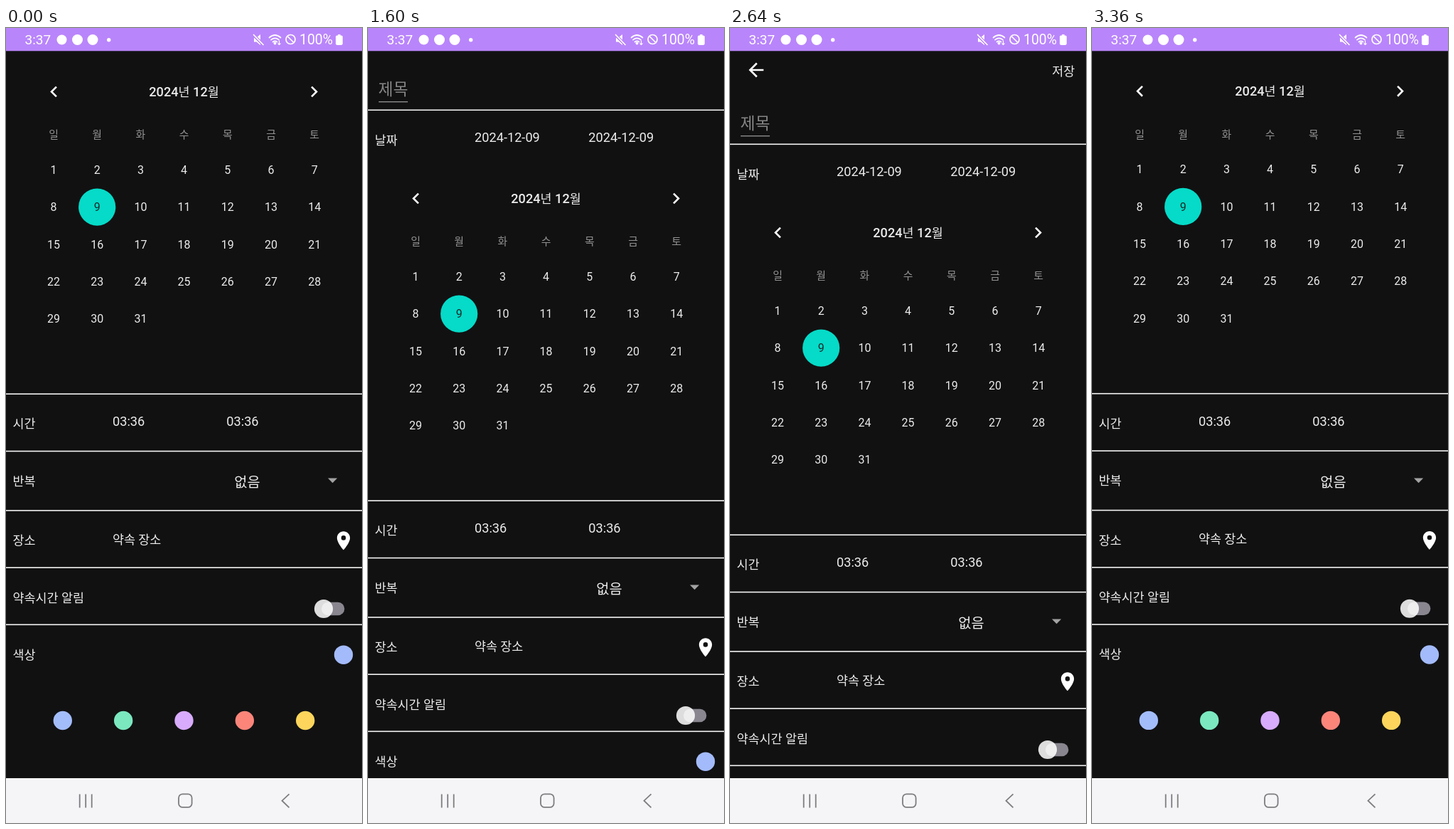
Recreate the animation shown at these times as an HTML page. Size 501 by 1117 pixels, loop 3440 ms.

```html
<!DOCTYPE html>
<html lang="ko">
<head>
<meta charset="utf-8">
<title>일정 추가</title>
<style>
  html, body { margin: 0; width: 100%; height: 100%; overflow: hidden; background: #111; }
  svg { display: block; width: 100%; height: 100%; }
  text { font-family: Roboto, 'Noto Sans CJK KR', 'Noto Sans CJK', sans-serif; fill: #ececec; }
  .mid { text-anchor: middle; }
  .bar text { fill: #fff; }
</style>
</head>
<body>
<svg viewBox="0 0 501 1117">
  <rect width="501" height="1117" fill="#111112"/>
  <g id="page"></g>
  <g class="bar">
    <rect width="501" height="32.3" fill="#b985fb"/>
    <text x="26.5" y="23" font-size="19">3:37</text>
    <g fill="#fff">
      <circle cx="78.5" cy="16.5" r="7"/>
      <circle cx="100.5" cy="16.5" r="7.5"/>
      <circle cx="122" cy="16.5" r="7.5"/>
      <circle cx="144.7" cy="16.7" r="2.7"/>
      <path d="M349 13.5h3.5l5.5-4.5v15l-5.5-4.5h-3.5z"/>
      <path d="M465.8 10.5h1.4v-1.5h3.4v1.5h1.4q1.8 0 1.8 1.8v9.8q0 1.8-1.8 1.8h-6.2q-1.8 0-1.8-1.8v-9.8q0-1.8 1.8-1.8z"/>
      <circle cx="378.5" cy="21.5" r="1.9"/>
    </g>
    <path d="M348 9.5L362 23.5" stroke="#b985fb" stroke-width="4"/>
    <g fill="none" stroke="#fff" stroke-width="1.7" stroke-linecap="round">
      <path d="M348.5 9.5L362 23.5"/>
      <path d="M370.5 13.5q8-7 16 0M373 16.7q5.500-4.500 11 0M375.500 19.500q3-2.300 6 0"/>
      <path d="M384.500 18v5.500m-1.700-1.700l1.700 1.700 1.700-1.700" stroke-width="1.200"/>
      <circle cx="400.5" cy="16" r="6.5"/>
      <path d="M396 11.500l9 9"/>
    </g>
    <text x="413" y="23" font-size="19.4">100%</text>
  </g>
  <rect y="1054" width="501" height="63" fill="#f5f5f7"/>
  <g fill="none" stroke="#7d7d81" stroke-width="1.8">
    <path d="M103.700 1076.500v19M112.200 1076.500v19M120.700 1076.500v19"/>
    <rect x="243" y="1076.300" width="18.600" height="18.600" rx="5.500"/>
    <path d="M398.500 1076.300L388.500 1085.700L398.500 1095.300"/>
  </g>
</svg>
<script>
const LOOP = 3440, STEP = 80, TOP = 32, BOTTOM = 1054, DP = 1.305;
const page = document.getElementById('page');
const items = [];

// Adds markup drawn around a local y of 0; y is its place with the page scrolled to the end.
function add(y, markup, rigid = false) {
  const el = document.createElementNS('http://www.w3.org/2000/svg', 'g');
  el.innerHTML = markup;
  page.append(el);
  items.push({ el, y, rigid });
  return el;
}
const text = (y, x, size, str, attrs = '', lift = 0.38) =>
  add(y, `<text x="${x}" y="${size * lift}" font-size="${size}" ${attrs}>${str}</text>`);
const digits = (y, x, size, str, attrs) => text(y, x, size, str, attrs, 0.356);
const disc = (y, x, r, fill) => add(y, `<circle cx="${x}" r="${r}" fill="${fill}"/>`);
const icon = (y, x, d) =>
  add(y, `<path transform="translate(${x}) scale(${DP}) translate(-12 -12)" fill="#fff" fill-rule="evenodd" d="${d}"/>`);

// Header and title field
icon(-139, 36.8, 'M20 11H7.83l5.59-5.59L12 4l-8 8 8 8 1.41-1.41L7.83 13H20z');
text(-138, 453.3, 17.4, '저장', 'font-weight="500"');
text(-64.5, 14.5, 22.8, '제목', 'style="fill:#858585"');
add(-46.3, '<rect x="15" y="-.7" width="41" height="1.4" fill="#8b8b8b"/>');

// Dividers and row labels
for (const y of [-34.7, 514.2, 594.6, 678, 758.2, 838.3])
  add(y, '<rect y="-.8" width="501" height="1.6" fill="#f4f4f4"/>');
Object.entries({ 날짜: 7, 시간: 555.5, 반복: 636, 장소: 719.5, '약속시간 알림': 800, 색상: 880 })
  .forEach(([label, y]) => text(y, 9.6, 17.4, label));
for (const x of [150, 310.3]) {
  digits(4, x, 18.2, '2024-12-09');
  digits(553, x, 18.2, '03:36');
}

// Calendar
icon(89.5, 67.4, 'M15.41 7.41L14 6l-6 6 6 6 1.41-1.41L10.83 12z');
icon(89.5, 433.6, 'M8.59 16.59L13.17 12 8.59 7.41 10 6l6 6-6 6z');
const hangul = s => `<tspan font-size="17.4">${s}</tspan>`;
digits(89.5, 250.5, 18.2, `2024${hangul('년')} 12${hangul('월')}`, 'class="mid" font-weight="500"');
const column = i => 67 + 61.2 * i;
const week = j => 199.2 + 52.35 * j;
[...'일월화수목금토'].forEach((day, i) =>
  text(149.5, column(i), 14.9, day, 'class="mid" style="fill:#929292"'));
disc(week(1), column(1), 26.1, '#05dbc8');
const ripple = disc(week(4), column(0), 26.1, '#404141');
for (let day = 1; day <= 31; day++) {
  const i = day - 1;
  digits(week(Math.floor(i / 7)), column(i % 7), 16, day,
    'class="mid"' + (day === 9 ? ' style="fill:#1c2a2a"' : ''));
}

// Repeat, place, alarm and colour controls
text(637.5, 321.2, 19.8, '없음');
add(636, '<path d="M453-3.400h13.200l-6.600 6.600z" fill="#a3a3a3"/>', true);
text(718, 150, 17.4, '약속 장소');
icon(720.3, 475, 'M12 2C8.13 2 5 5.13 5 9c0 5.25 7 13 7 13s7-7.75 7-13c0-3.87-3.130-7-7-7zm0 9.500a2.500 2.500 0 0 1 0-5 2.500 2.500 0 0 1 0 5z');
add(816, '<rect x="444" y="-9.200" width="32.400" height="18.400" rx="9.200" fill="#89868f"/>' +
  '<circle cx="447" r="13.100" fill="#fff" opacity=".86"/>');
disc(880.7, 475, 13.2, '#a3bbfb');
['#a3bdfb', '#7be8bf', '#d8abfc', '#fc857a', '#fdd55c']
  .forEach((fill, i) => disc(973, 79.8 + 85.35 * i, 13.2, fill));

// Scroll distance from the end of the page, and overscroll (+ top edge, - bottom edge).
const scrollKeys = [[1280, 0], [1360, 10], [1440, 45], [1520, 97], [1600, 150], [1680, 192], [1760, 213],
  [2560, 213], [2640, 198], [2720, 156], [2800, 108.3], [2880, 66], [2960, 32], [3040, 10], [3120, 0]];
const stretchKeys = [[1760, 0.2], [1840, 0.8], [1920, 1], [2000, 0.55], [2080, 0.22], [2160, 0.07], [2240, 0],
  [3040, 0], [3120, -0.5], [3200, -0.35], [3280, -0.15], [3360, -0.05]];

function sample(keys, t) {
  const n = keys.findIndex(([time]) => time > t);
  if (n === 0) return 0;
  if (n < 0) return keys[keys.length - 1][1];
  const [t0, a] = keys[n - 1], [t1, b] = keys[n];
  return a + (b - a) * (t - t0) / (t1 - t0);
}

const bulge = d => 0.0251 * d - 1.2e-5 * d * d;

function draw(now) {
  const t = Math.floor(now % LOOP / STEP) * STEP;
  const scroll = sample(scrollKeys, t), stretch = sample(stretchKeys, t);
  for (const { el, y, rigid } of items) {
    let pos = y + scroll;
    if (!rigid) pos += stretch * bulge(stretch > 0 ? pos - TOP : BOTTOM - pos);
    el.setAttribute('transform', `translate(0 ${pos.toFixed(2)})`);
  }
  ripple.setAttribute('visibility', t >= 720 && t < 1360 ? 'visible' : 'hidden');
}

const start = performance.now();
function tick() {
  draw(performance.now() - start);
  requestAnimationFrame(tick);
}
tick();
</script>
</body>
</html>
```
